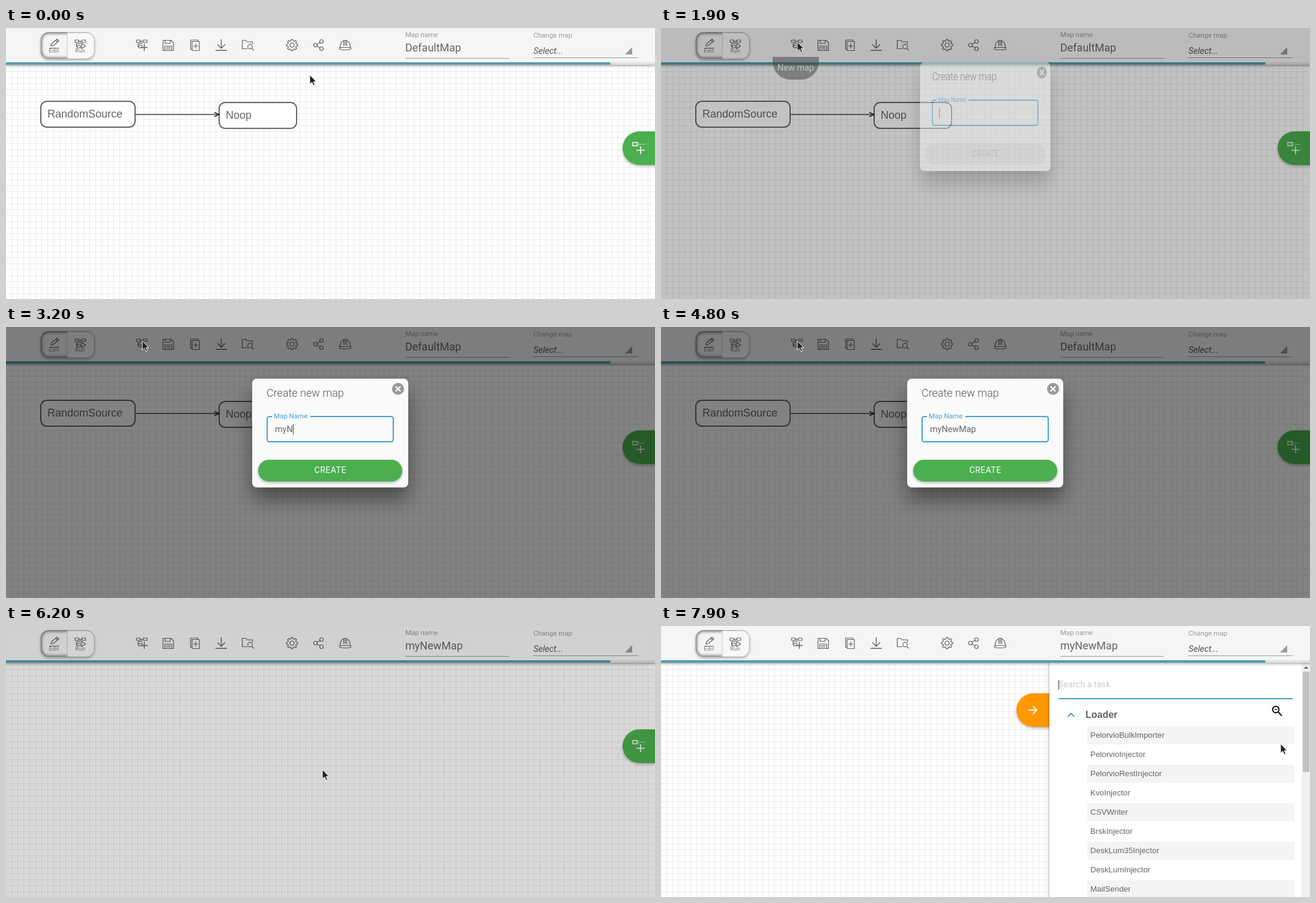
An HTML page that plays this animation: 1081x451 px, repeating every 8 s.

```html
<!DOCTYPE html>
<html lang="en">
<head>
<meta charset="utf-8">
<title>Map editor</title>
<style>
  html, body { margin: 0; width: 100%; height: 100%; overflow: hidden; background: #fff; }
  svg { display: block; width: 100%; height: 100%; }
  text { font-family: Roboto, sans-serif; white-space: pre; }
  .sans text, text.sans { font-family: "Liberation Sans", Arial, sans-serif; }
  .icon { fill: none; stroke: #616161; stroke-width: 1.2; stroke-linejoin: round; stroke-linecap: round; }
</style>
</head>
<body>
<svg id="stage" viewBox="0 0 1081 451" xmlns="http://www.w3.org/2000/svg">
  <defs>
    <pattern id="grid" x="9" y="2" width="10" height="10" patternUnits="userSpaceOnUse">
      <path d="M0 .5H10M.5 0V10" stroke="#ebebeb" fill="none"/>
    </pattern>
    <filter id="barShade" x="-5%" y="-20%" width="110%" height="150%"><feDropShadow dx="0" dy="2" stdDeviation="2" flood-opacity=".32"/></filter>
    <filter id="soft" x="-30%" y="-30%" width="160%" height="180%"><feDropShadow dx="0" dy="2" stdDeviation="2" flood-opacity=".3"/></filter>
    <filter id="fabShade" x="-40%" y="-40%" width="180%" height="180%"><feDropShadow id="fabDrop" dx="0" dy="2" stdDeviation="2" flood-opacity=".3"/></filter>
    <filter id="deep" x="-40%" y="-40%" width="180%" height="200%"><feDropShadow dx="0" dy="20" stdDeviation="17" flood-opacity=".42"/></filter>
    <filter id="side" x="-10%" y="-10%" width="120%" height="120%"><feDropShadow dx="-1" dy="0" stdDeviation="2" flood-opacity=".3"/></filter>
    <filter id="blur" x="-30%" y="-30%" width="160%" height="160%"><feGaussianBlur stdDeviation="2"/></filter>
    <clipPath id="editClip"><path d="M102 7H71a13 13 0 0 0-13 13V38a13 13 0 0 0 13 13H102Z"/></clipPath>
    <g id="flow">
      <path d="M.5 1.5h6v4h-6zM12 1.5h6v4h-6zM6.5 3.5H12M9.2 3.5v4H3v5M3 12.5h1M4 10.5h5.500v4H4z"/>
    </g>
  </defs>

  <rect width="1081" height="451" fill="#fff"/>
  <rect y="61" width="1077" height="390" fill="url(#grid)"/>

  <g id="nodes" class="sans" font-size="18" fill="#666">
    <g fill="#fff" stroke="#666" stroke-width="2">
      <rect x="58" y="122" width="157" height="43" rx="10"/>
      <rect x="355" y="124" width="129" height="43" rx="10"/>
    </g>
    <path d="M216 144H354" stroke="#444" stroke-width="1.5"/>
    <path d="M347 140.500L355 144L347 147.500" fill="none" stroke="#222" stroke-width="1.4"/>
    <text x="69" y="149">RandomSource</text>
    <text x="366" y="151">Noop</text>
  </g>

  <g id="fab">
    <path d="M1085 172H1055a28 28 0 0 0 0 56H1085Z" fill="#4caf50" filter="url(#fabShade)"/>
    <g fill="none" stroke="#fff">
      <path d="M1044 190.500h7v5.500h-7z" stroke-width="1.4"/>
      <path d="M1053 193.500H1065M1053.500 190V198" stroke-dasharray="1.500 1"/>
      <path d="M1050 203.500H1064M1057 197V210" stroke-width="1.7"/>
    </g>
  </g>

  <g id="panel">
    <g id="backFab">
      <path d="M650 112H620a28 28 0 0 0 0 56H650Z" fill="#ff9800" filter="url(#soft)"/>
      <path d="M612 140H626M619.500 133.500L626 140L619.500 146.500" fill="none" stroke="#fff" stroke-width="1.8"/>
    </g>
    <rect x="647" y="55" width="440" height="400" fill="#fff" filter="url(#side)"/>
    <text x="662" y="102" font-size="14.4" fill="#ccc">Search a task</text>
    <path d="M662.500 90V106" stroke="#333"/>
    <path d="M662 121H1052" stroke="#4a9fc6" stroke-width="2"/>
    <path d="M677.500 151L683 145.500L688.500 151" fill="none" stroke="#4a9fc6" stroke-width="2"/>
    <text class="sans" x="707" y="153" font-size="16" font-weight="700" fill="#616161">Loader</text>
    <g fill="none" stroke="#111" stroke-width="2">
      <circle cx="1024" cy="139" r="5.300"/>
      <path d="M1028 143L1034 149.500"/>
      <path d="M1021.500 139H1026.500" stroke-width="1.300"/>
    </g>
    <g id="tasks" class="sans" font-size="13.333" fill="#666"></g>
    <rect x="1067" y="61" width="14" height="390" fill="#f1f1f1"/>
    <rect x="1069" y="76" width="11" height="167" fill="#c1c1c1"/>
    <path d="M1070.500 71L1074.500 67L1078.500 71Z" fill="#666"/>
  </g>

  <g id="header">
    <rect x="-10" y="-10" width="1101" height="71" fill="#f5f5f5" filter="url(#barShade)"/>
    <rect y="57" width="1081" height="4" fill="#e3e3e3"/>
    <path d="M0 57H1005a2 2 0 0 1 0 4H0Z" fill="#4f9fac"/>

    <rect x="58" y="7.500" width="89" height="43.500" rx="13" fill="#f4f4f4" stroke="#aaa" filter="url(#soft)"/>
    <g clip-path="url(#editClip)">
      <path d="M104 7.500H71a13 13 0 0 0-13 13V38a13 13 0 0 0 13 13H104" fill="none" stroke="#555" stroke-width="3" filter="url(#blur)"/>
      <path d="M102 7V51" stroke="#777" stroke-width="2" filter="url(#blur)"/>
    </g>
    <path d="M102 8H134a13 13 0 0 1 13 13V38a13 13 0 0 1-13 13H102Z" fill="#f8f8f8" stroke="#bbb" stroke-width=".8"/>
    <g font-size="9" fill="#777" text-anchor="middle" letter-spacing=".5">
      <text x="80" y="41">Edit</text><text x="123.800" y="41">Run</text>
    </g>

    <g class="icon">
      <path d="M73 33.500H88M75 30l1-4L85 18.500l3 3L79 29zM83 20.500l3 3"/>
      <use href="#flow" x="114.500" y="18.500"/>
      <path d="M126 25.500V34.500L132.500 30Z"/>
      <use href="#flow" x="217" y="18.500"/>
      <path d="M225 32.500H235.500M230.300 27V37.500" stroke-width="1.500"/>
      <path d="M261.500 20.500H275L279 24.500V37.500H261.500ZM265 20.500V25.500H273.500V20.500M264.500 37.500V30H276V37.500M267 32.500H273.500M267 35H273.500"/>
      <path d="M310 22.500H322V37.500H310ZM310 35.500H307.500V20H319.500V22.500M312.500 30H319.500M316 26.500V33.500"/>
      <path d="M358.500 19.500V33.500M352.500 27.800L358.500 33.800L364.500 27.800M349.500 37.300H367.500" stroke-width="1.400"/>
      <path d="M402 34.500H393.500V20.500H399.500L401.500 23H410.500V26.500"/>
      <circle cx="406.500" cy="31" r="3.800"/><path d="M409.300 33.800L412.500 37"/>
      <path id="gear"/><circle cx="476.500" cy="28.500" r="3.500"/>
      <circle cx="515.500" cy="28.500" r="3"/><circle cx="525.500" cy="22.500" r="3"/><circle cx="525.500" cy="34.500" r="3"/>
      <path d="M518 27L523 24M518 30L523 33"/>
      <path d="M555.500 32.500H574.500V35L570 36.500H560L555.500 35ZM556.500 32.500C556.500 26 559 22.500 562.500 21.500M567.500 21.500C571 22.500 573.500 26 573.500 32.500M562.500 29.500V20.500H567.500V29.500M565 20.500V29"/>
    </g>

    <g font-size="11.500" fill="#999"><text x="665" y="15">Map name</text><text x="878.500" y="16">Change map</text></g>
    <text id="mapName" x="665" y="39" font-size="18" fill="#666"></text>
    <text x="878.500" y="43" font-size="14.400" font-style="italic" fill="#555">Select...</text>
    <path d="M665 50.500H838M878 49.500H1052" stroke="#999"/>
    <path d="M1043 32V44H1031Z" fill="#999"/>
  </g>

  <g id="tip">
    <path d="M186 48H263V56a30 30 0 0 1-30 30H216a30 30 0 0 1-30-30Z" fill="#555" fill-opacity=".56"/>
    <text x="224.500" y="71" font-size="14.400" fill="#fff" text-anchor="middle">New map</text>
  </g>

  <rect id="shade" width="1081" height="451"/>

  <g id="modal">
    <rect x="410" y="86" width="260" height="181" rx="8" fill="#fafafa" filter="url(#deep)"/>
    <text x="434" y="116" font-size="18" font-weight="300" fill="#555">Create new map</text>
    <circle cx="653" cy="103" r="10" fill="#999"/>
    <path d="M648.800 98.800l8.400 8.400M657.200 98.800l-8.400 8.400" stroke="#fff" stroke-width="2.200"/>
    <rect x="435" y="149" width="210" height="42" rx="3.500" fill="none" stroke="#459fdc" stroke-width="2"/>
    <rect x="443" y="147" width="64" height="4" fill="#fafafa"/>
    <text x="446" y="152" font-size="11.500" fill="#459fdc">Map Name</text>
    <text id="typed" x="448" y="175" font-size="14.400" fill="#666"></text>
    <path id="caret" d="M448.500 162V179" stroke="#444"/>
    <rect x="420" y="221" width="240" height="36" rx="18" fill="#e8e8e8"/>
    <rect id="go" x="420" y="221" width="240" height="36" rx="18" fill="#4caf50" filter="url(#soft)"/>
    <text id="goText" x="540.250" y="243" font-size="14" letter-spacing=".5" text-anchor="middle">CREATE</text>
  </g>

  <path id="cursor" d="M0 0V15.500L3.600 12.200L6 17.800L8.600 16.700L6.200 11.300H10.800Z" fill="#222" stroke="#fff" stroke-width="1"/>
</svg>
<script>
const LOOP = 8000, STEP = 100, NAME = "myNewMap";
const $ = id => document.getElementById(id);
const set = (id, attr, v) => $(id).setAttribute(attr, v);
const fade = (id, v) => set(id, "opacity", v);
const show = (id, on) => set(id, "visibility", on ? "visible" : "hidden");

// Linear interpolation over rows of [time, value, ...]
function track(t, rows) {
  const i = rows.findIndex(r => r[0] > t);
  if (i === 0) return rows[0].slice(1);
  if (i < 0) return rows[rows.length - 1].slice(1);
  const a = rows[i - 1], b = rows[i], k = (t - a[0]) / (b[0] - a[0]);
  return a.slice(1).map((v, j) => v + (b[j + 1] - v) * k);
}

const pointer = [
  [600, 506, 78], [700, 466, 79], [800, 390, 81], [900, 337, 82], [1000, 337, 82],
  [1100, 318, 76], [1200, 272, 50], [1300, 238, 29], [1400, 227, 23],
  [5100, 227, 23], [5200, 262, 48], [5300, 365, 125], [5400, 480, 208], [5500, 527, 239],
  [6700, 527, 239], [6800, 548, 240], [7000, 690, 236], [7300, 955, 208], [7500, 1032, 196]
];
const dialog = [ // opacity, x scale, y shift
  [1700, 0, .8, -35], [1800, .06, .8, -34], [1900, .46, .835, -29], [2000, .9, .96, -7], [2100, 1, 1, 0],
  [5700, 1, 1, 0], [5800, .7, .95, -8], [5900, .2, .84, -27], [6000, 0, .8, -35]
];
const dim = [[1700, 0], [1800, .03], [1900, .24], [2000, .44], [2100, .49],
  [6000, .49], [6100, .35], [6200, .15], [6300, .15], [6400, 0]];
const tip = [[1500, 0], [1600, .6], [1700, 1], [1900, .9], [2000, .4], [2100, .06], [2200, .06], [2300, 0]];
const slide = [[7600, 434], [7700, 320], [7800, 110], [7900, 0]];
const keys = [2700, 2900, 3200, 3400, 3600, 4000, 4100, 4200];

function caretOn(t) {
  return t < 2300 || (t >= 2700 && t < 4800) || (t >= 5300 && t < 5800);
}

function draw(time) {
  const t = Math.floor(time / STEP) * STEP;
  const fresh = t >= 5900;
  show("nodes", !fresh);
  $("mapName").textContent = fresh ? NAME : "DefaultMap";

  const [x, y] = track(t, pointer);
  set("cursor", "transform", `translate(${x} ${y})`);
  fade("tip", track(t, tip)[0]);
  fade("shade", track(t, dim)[0]);

  const [alpha, sx, dy] = track(t, dialog);
  fade("modal", alpha);
  show("modal", alpha > 0);
  set("modal", "transform", `translate(${540 * (1 - sx)} ${dy}) scale(${sx} 1)`);

  $("typed").textContent = NAME.slice(0, keys.filter(k => k <= t).length);
  set("caret", "transform", `translate(${Math.round($("typed").getComputedTextLength())} 0)`);
  fade("caret", caretOn(t) ? 1 : 0);
  const ready = track(t, [[2600, 0], [2700, .25], [2800, .75], [2900, .96], [3100, .96], [3200, 1]])[0];
  fade("go", ready);
  set("goText", "fill", ready > .4 ? "#fff" : "#b8b8b8");

  const open = t >= 7700, [px] = track(t, slide);
  show("fab", !open);
  show("panel", open);
  set("panel", "transform", `translate(${px} 0)`);
  set("fabDrop", "stdDeviation", track(t, [[7300, 2], [7500, 3.5]])[0]);
}

function build() {
  const tasks = ["PelorvioBulkImporter", "PelorvioInjector", "PelorvioRestInjector", "KvoInjector",
    "CSVWriter", "BrskInjector", "DeskLum35Injector", "DeskLumInjector", "MailSender"];
  $("tasks").innerHTML = tasks.map((name, i) =>
    (i % 2 ? "" : `<rect x="710" y="${167 + 32 * i}" width="345" height="30" fill="#f4f4f4"/>`) +
    `<text x="715" y="${186 + 32 * i}">${name}</text>`).join("");

  const rim = [];
  for (let i = 0; i < 8; i++) {
    for (const [off, r] of [[-.25, 7.2], [-.15, 9.5], [.15, 9.5], [.25, 7.2]]) {
      const a = i * Math.PI / 4 + off;
      rim.push(`${(476.5 + r * Math.cos(a)).toFixed(2)} ${(28.5 + r * Math.sin(a)).toFixed(2)}`);
    }
  }
  set("gear", "d", `M${rim.join("L")}Z`);
}

build();
const start = performance.now();
function tick() {
  draw((performance.now() - start) % LOOP);
  requestAnimationFrame(tick);
}
tick();
</script>
</body>
</html>
```
